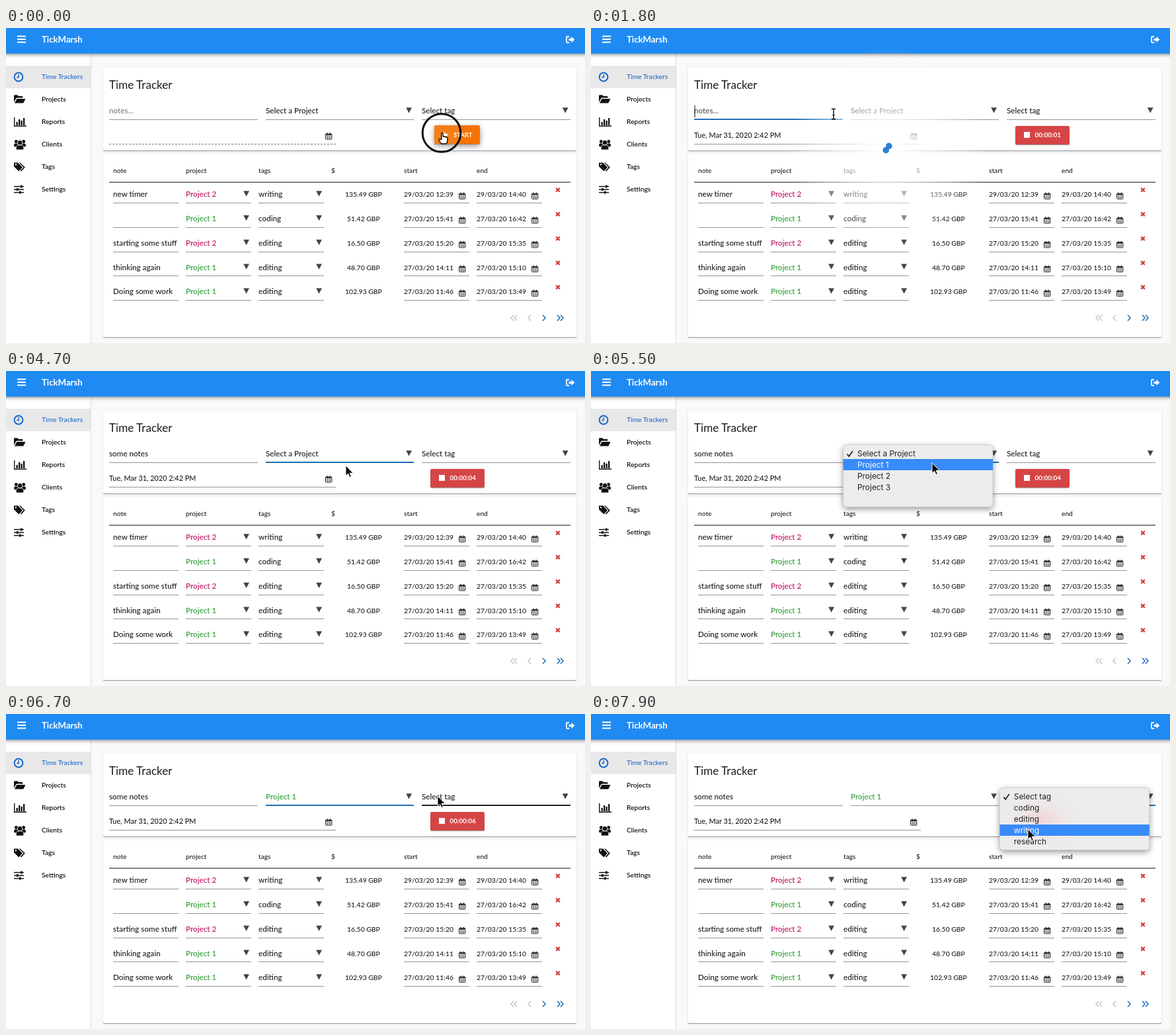
These frames come from a looping animation (876x476 px, 8000 ms). An HTML page:

```html
<!DOCTYPE html>
<html lang="en">
<head>
<meta charset="utf-8">
<title>Time Tracker</title>
<style>
html, body { margin: 0; width: 100%; height: 100%; overflow: hidden; background: #f9f9f9; }
svg { display: block; width: 876px; height: 476px; }
text { font: 500 11.7px Lato, sans-serif; fill: #1c1c1c; white-space: pre; }
.title { font-size: 17.1px; font-weight: 400; }
.brand { font-size: 13.2px; font-weight: 700; fill: #fff; }
.nav { font-size: 10.3px; fill: #000; }
.head { font-size: 10.2px; }
.num { font-size: 10.4px; }
.date { font-size: 10.9px; }
.btn { font-size: 9.5px; font-weight: 700; fill: #fff; }
.count { font-size: 9.9px; font-weight: 700; fill: #fff; }
.pop { font: 400 11.9px Inter, sans-serif; fill: #222; }
.raised { filter: drop-shadow(0 1px .6px rgba(0,0,0,.3)) drop-shadow(0 1px 1.5px rgba(0,0,0,.14)); }
.bar { filter: drop-shadow(0 2px 2.5px rgba(0,0,0,.4)); }
.lifted { filter: drop-shadow(0 3px 4px rgba(0,0,0,.45)); }
.menu { filter: drop-shadow(0 3px 5px rgba(0,0,0,.4)); }
</style>
</head>
<body>
<svg id="stage" viewBox="0 0 876 476">
  <defs>
    <radialGradient id="haze">
      <stop offset="0" stop-color="#fff" stop-opacity=".97"/>
      <stop offset=".13" stop-color="#fff" stop-opacity=".92"/>
      <stop offset=".4" stop-color="#fff" stop-opacity=".66"/>
      <stop offset=".7" stop-color="#fff" stop-opacity=".38"/>
      <stop offset="1" stop-color="#fff" stop-opacity="0"/>
    </radialGradient>
    <radialGradient id="blush">
      <stop offset="0" stop-color="#f4cfd2" stop-opacity=".8"/>
      <stop offset="1" stop-color="#ececec" stop-opacity="0"/>
    </radialGradient>
  </defs>
</svg>
<script>
const stage = document.getElementById('stage');
const BLUE = '#1f6fb5', PINK = '#c0105f', GREEN = '#2f9e36', LINE = '#949494';

function el(tag, attrs, parent = stage) {
  const node = document.createElementNS('http://www.w3.org/2000/svg', tag);
  for (const key in attrs) node.setAttribute(key, attrs[key]);
  parent.appendChild(node);
  return node;
}
const group = (attrs = {}, parent) => el('g', attrs, parent);
const rect = (x, y, width, height, fill, parent, more) =>
  el('rect', { x, y, width, height, fill, ...more }, parent);
const path = (d, fill, parent, more) => el('path', { d, fill, ...more }, parent);
function text(x, y, str, cls = '', parent, style = '') {
  const node = el('text', { x, y, class: cls, style }, parent);
  node.textContent = str;
  return node;
}
const at = (x, y, parent) => group({ transform: `translate(${x} ${y})` }, parent);
const show = (node, on) => node.setAttribute('visibility', on ? 'visible' : 'hidden');

const arrow = (x, y) => path(`M${x} ${y}h8.8l-4.4 8.2z`, '#444');
function calendar(x, y) {
  const g = at(x, y);
  rect(.5, 1.8, 9.4, 8.2, 'none', g, { rx: .8, stroke: '#333' });
  rect(.5, 1.8, 9.4, 2.2, '#333', g);
  path('M3 0v2.6M7.4 0v2.6', 'none', g, { stroke: '#333', 'stroke-width': 1.5 });
  path('M3.6 4v6M6.8 4v6M.5 6h9.4M.5 8h9.4', 'none', g, { stroke: '#333', 'stroke-width': .6 });
}
function underline(x, y, w) {
  return rect(x, y, w, 1, LINE);
}
// Form field line: plain, hovered or focused.
function setLine(line, mode) {
  line.setAttribute('height', mode ? 2 : 1);
  line.setAttribute('y', mode ? 137 : 138);
  line.setAttribute('fill', mode === 'focus' ? BLUE : mode === 'hover' ? '#222' : LINE);
}

// Page frame
rect(0, 0, 876, 476, '#f9f9f9');
rect(0, 39, 128, 437, '#fff');
rect(128, 39, 1, 437, '#dcdcdc');
rect(0, 57, 128, 34, '#e8e8e8');
rect(-10, -10, 896, 48.7, '#1f8bf2', stage, { class: 'bar' });
for (const y of [11.5, 16, 20.5]) rect(17, y, 13, 2, '#fff');
text(54, 22, 'TickMarsh', 'brand');
const exit = at(847, 12);
path('M5 1H2.2Q1 1 1 2.2V8.8Q1 10 2.2 10H5', 'none', exit, { stroke: '#fff', 'stroke-width': 1.8 });
path('M4.5 3.8h4V1L13.4 5.5 8.5 10V7.3h-4z', '#fff', exit);

// Sidebar
['Time Trackers', 'Projects', 'Reports', 'Clients', 'Tags', 'Settings'].forEach((name, i) =>
  text(54, 77.3 + 34 * i, name, 'nav', stage, i ? '' : 'fill:#1a69c4'));
el('circle', { cx: 19, cy: 74, r: 6.4, fill: 'none', stroke: '#1a69c4', 'stroke-width': 2 });
path('M19.2 70v4.6H16', 'none', stage, { stroke: '#1a69c4', 'stroke-width': 1.5 });
path('M12 112V102.5q0-1.3 1.3-1.3h4l1.7 1.8h5.2q1.2 0 1.2 1.3v1.2H17q-1.3 0-2 1.2z', '#111');
path('M13 113.6l2.8-5.7q.5-1 1.6-1h11.2q1 0 .5 1l-2.5 4.8q-.5.9-1.5.9z', '#111');
path('M12.7 135v13.3H31', 'none', stage, { stroke: '#111', 'stroke-width': 1.4 });
[[15.5, 5], [19, 9], [22.5, 7], [26, 11]].forEach(([x, h]) => rect(x, 147 - h, 2.3, h, '#111'));
const people = at(21, 176);
for (const side of [-1, 1]) {
  el('circle', { cx: side * 5.6, cy: -4.6, r: 2.5, fill: '#111' }, people);
  rect(side * 5.8 - 3.1, -1.6, 6.2, 5, '#111', people, { rx: 2 });
}
el('circle', { cx: 0, cy: -2.8, r: 3.8, fill: '#111', stroke: '#fff', 'stroke-width': .8 }, people);
path('M-5.6 8q-1-6.5 3-7h5.2q4 .5 3 7z', '#111', people, { stroke: '#fff', 'stroke-width': .7 });
path('M12 203.5h6l7 7-5.6 6L12 209.2zM14.9 205a1.2 1.2 0 1 0 .1 0z', '#111', stage, { 'fill-rule': 'evenodd' });
path('M19.8 203.5h1.7l7.3 7-5.8 6.2-1.2-1.1 4.7-5z', '#111');
[[239.5, 22], [244, 16], [248.5, 20]].forEach(([y, x]) => {
  rect(12, y - .7, 15, 1.5, '#111');
  rect(x, y - 2, 2.6, 4, '#111');
});

// Timer card
rect(147, 60, 716, 125, '#fff', stage, { class: 'raised', rx: 1 });
text(156, 92.3, 'Time Tracker', 'title');
const note = text(156, 129.3, '');
const caret = rect(156, 117, 1, 18, '#000');
const noteLine = underline(156, 138, 225);
const project = text(393, 129.3, '');
const projectLine = underline(393, 138, 224);
arrow(605.2, 120.3);
text(629, 129.3, 'Select tag');
const tagLine = underline(629, 138, 225);
arrow(841.8, 120.3);
calendar(483, 158.2);
const dashes = path('M156 175.5h343', 'none', stage, { stroke: '#777', 'stroke-dasharray': '3 2' });
const running = group();
text(156, 166, 'Tue, Mar 31, 2020 2:42 PM', 'date', running);
rect(156, 175, 343, 1, LINE, running);
const stop = group({ class: 'raised' }, running);
rect(642, 148, 82, 28, '#d64545', stop, { rx: 2 });
rect(655, 157, 9, 9, '#fff', stop);
const counter = text(671.5, 165.3, '', 'count', running);
const start = group();
const startBox = rect(648, 148, 69, 28, '#f57303', start, { rx: 2 });
const startEdge = path('M648 175.5h69', 'none', start, { stroke: '#a85818', 'stroke-dasharray': '3 2' });
path('M661 157l8.5 4.5-8.5 4.5z', '#fff', start);
text(677, 164.8, 'START', 'btn', start);

// Table card
rect(147, 191, 716, 276, '#fff', stage, { class: 'raised', rx: 1 });
[[162, 'note'], [272, 'project'], [382, 'tags'], [492, '$'], [602, 'start'], [712, 'end']]
  .forEach(([x, name]) => text(x, 219.3, name, 'head'));
rect(156, 232.3, 698, 1.6, '#666');
[
  ['new timer', 2, 'writing', '135.49', '29/03/20 12:39', '29/03/20 14:40'],
  ['', 1, 'coding', '51.42', '27/03/20 15:41', '27/03/20 16:42'],
  ['starting some stuff', 2, 'editing', '16.50', '27/03/20 15:20', '27/03/20 15:35'],
  ['thinking again', 1, 'editing', '48.70', '27/03/20 14:11', '27/03/20 15:10'],
  ['Doing some work', 1, 'editing', '102.93', '27/03/20 11:46', '27/03/20 13:49']
].forEach(([memo, id, tag, price, from, to], i) => {
  const y = 251.3 + 36.75 * i, base = y + 4, low = Math.round(y + 12.7);
  text(162, base, memo);
  text(272, base, 'Project ' + id, '', stage, `fill:${id === 1 ? GREEN : PINK}`);
  text(382, base, tag);
  text(541, base, price + ' GBP', 'num', stage, 'text-anchor:middle');
  text(602, base, from, 'num');
  text(712, base, to, 'num');
  for (const x of [162, 272, 382, 602, 712]) underline(x, low, 99);
  arrow(359.2, y - 5);
  arrow(469.2, y - 5);
  calendar(685, y - 2.9);
  calendar(795, y - 2.9);
  path(`M832.2 ${y - 9.4}l5.6 5.6m0-5.6l-5.6 5.6`, 'none', stage, { stroke: '#cf3e3e', 'stroke-width': 2.2 });
});
const chevron = (x, dir, stroke) => path(`M${x - 2 * dir} 433.7l${4 * dir} 4.4l${-4 * dir} 4.4`,
  'none', stage, { stroke, 'stroke-width': 1.5 });
[766, 771, 792].forEach(x => chevron(x, -1, '#c6c6c6'));
[814, 836, 841].forEach(x => chevron(x, 1, BLUE));

// Loading haze with two orbiting dots
const loader = group();
el('circle', { cx: 448, cy: 182, r: 150, fill: 'url(#haze)' }, loader);
const dots = [0, 1].map(() => el('circle', { r: 4.8, fill: '#2f7fd0' }, loader));

// Drop-down menus; a red button behind one shines through as a blush.
function dropdown(x, items, blush) {
  const g = group();
  rect(x, 111.5, 226.5, 94, '#ececec', g, { rx: 5, class: 'menu', stroke: '#bbb', 'stroke-width': .5 });
  if (blush) el('ellipse', { cx: 683, cy: 160, rx: 64, ry: 45, fill: 'url(#blush)' }, g);
  const bar = rect(x, 116, 226.5, 17, '#388bfb', g);
  const labels = items.map((name, i) => text(x + 21.5, 129.3 + 17 * i, name, 'pop', g));
  const check = path(`M${x + 6} 125.5l2.8 3.5 5.6-8`, 'none', g, { stroke: '#222', 'stroke-width': 1.7 });
  return (on, pick, flash) => {
    show(g, on);
    if (!on) return;
    bar.setAttribute('y', 116 + 17 * pick);
    bar.setAttribute('opacity', flash ? 0 : 1);
    labels.forEach((label, i) => label.style.fill = i === pick && !flash ? '#fff' : '');
    check.setAttribute('stroke', pick === 0 && !flash ? '#fff' : '#222');
  };
}
const projectMenu = dropdown(381.5, ['Select a Project', 'Project 1', 'Project 2', 'Project 3']);
const tagMenu = dropdown(618.3, ['Select tag', 'coding', 'editing', 'writing', 'research'], true);

// Pointer
const ring = el('circle', { fill: '#fff', 'fill-opacity': .08, stroke: '#111', 'stroke-width': 3 });
const pointer = group();
const shapes = {
  arrow: path('M0 0V15.4L3.6 12.2 6 17.6 8.4 16.5 6 11.3H11.2Z', '#000', pointer,
    { stroke: '#fff', 'stroke-width': 1 }),
  hand: path('M-1.2 1.2Q0-.6 1.2 1.2V6.2Q2.8 5 3.6 6.6 5.2 5.6 6 7.4 8 6.6 8 9V12L6.6 17H-1.4L-5.4 10.8Q-4.8 8.4-1.2 11Z',
    '#fff', pointer, { stroke: '#000', 'stroke-width': 1.3, 'stroke-linejoin': 'round' }),
  beam: path('M-3-8Q0-8 0-6V6Q0 8-3 8M3-8Q0-8 0-6M0 6Q0 8 3 8M-1.5 1.5h3', 'none', pointer,
    { stroke: '#000', 'stroke-width': 1.3 })
};

// Timing, in ms
const LOOP = 8000, BEGAN = 500, LIVE = 1700;
const loads = [[300, 2150], [4150, 4600], [6250, 6680]];
const clicks = [[-100, 659, 158.5], [1300, 367, 130], [5050, 514, 128], [6000, 516, 140], [7130, 653, 124]];
const keys = [2400, 2530, 2670, 2800, 2930, 3060, 3200, 3400, 3550, 3750];
const moves = [
  [0, 660, 158], [400, 660, 158], [950, 367, 130], [4100, 367, 130], [4600, 514, 143], [4800, 514, 143],
  [5000, 514, 128], [5150, 514, 128], [5450, 516, 139], [6200, 516, 139], [6600, 653, 124],
  [7200, 653, 124], [7750, 661, 174], [8000, 661, 174]
];
const within = (t, a, b) => t >= a && t < b;
const clamp = v => Math.max(0, Math.min(1, v));
const ease = v => v * v * (3 - 2 * v);

function locate(t) {
  const i = moves.findIndex(m => m[0] > t), a = moves[i - 1], b = moves[i];
  const k = ease((t - a[0]) / (b[0] - a[0]));
  return [a[1] + (b[1] - a[1]) * k, a[2] + (b[2] - a[2]) * k];
}

function render(t) {
  const typed = keys.filter(k => k <= t).length;
  note.textContent = typed ? 'some notes'.slice(0, typed) : 'notes…';
  note.style.fill = typed ? '' : t < 900 ? '#7c7c7c' : '#555';
  const writing = within(t, 1300, 4150);
  setLine(noteLine, writing && 'focus');
  show(caret, writing);
  caret.setAttribute('x', 156.5 + (typed ? note.getComputedTextLength() : 0));

  const chosen = t >= 6150;
  project.textContent = chosen ? 'Project 1' : 'Select a Project';
  project.style.fill = chosen ? GREEN : '';
  setLine(projectLine, within(t, 4150, 7130) && 'focus');
  setLine(tagLine, t >= 7130 ? 'focus' : t >= 6500 && 'hover');

  const live = t >= LIVE, hot = t < 500;
  show(running, live);
  show(start, !live);
  show(dashes, !live);
  show(startEdge, hot && !live);
  startBox.setAttribute('class', hot ? 'lifted' : 'raised');
  startBox.setAttribute('y', hot ? 147 : 148);
  // The open menu blocks the counter.
  const seconds = Math.floor((within(t, 5100, 6150) ? 5100 : t) - BEGAN) / 1000;
  counter.textContent = '00:00:0' + Math.max(0, Math.floor(seconds));

  const load = loads.find(([a, b]) => within(t, a, b));
  show(loader, load);
  if (load) {
    loader.setAttribute('opacity', Math.min(clamp((t - load[0]) / 200), clamp((load[1] - t) / 200)));
    const angle = .3 + (t - 1000) / 1000 * 2 * Math.PI;
    const reach = 2.2 + 5 * Math.sin((t - 1000) / 1000 * Math.PI) ** 2;
    dots.forEach((dot, i) => {
      const side = i ? 1 : -1;
      dot.setAttribute('cx', 448.5 + side * reach * Math.cos(angle));
      dot.setAttribute('cy', 181.5 + side * reach * Math.sin(angle));
    });
  }

  const [x, y] = locate(t);
  projectMenu(within(t, 5100, 6150), y < 133 ? 0 : 1, within(t, 6020, 6080));
  tagMenu(t >= 7180, Math.max(0, Math.min(4, Math.floor((y - 116) / 17))), false);

  const click = clicks.find(([a]) => within(t, a, a + 250));
  show(ring, click);
  if (click) {
    const k = clamp((t - click[0] - 120) / 130);
    ring.setAttribute('cx', click[1]);
    ring.setAttribute('cy', click[2]);
    ring.setAttribute('r', 28.8 - 10 * k);
    ring.setAttribute('opacity', 1 - k);
  }

  const kind = x > 648 && hot ? 'hand' : within(t, 900, 4150) ? 'beam' : 'arrow';
  for (const name in shapes) show(shapes[name], name === kind && !within(t, 2400, 4100));
  pointer.setAttribute('transform', `translate(${x} ${y})`);
}

const zero = performance.now();
function frame() {
  render((performance.now() - zero) % LOOP);
  requestAnimationFrame(frame);
}
frame();
</script>
</body>
</html>
```
